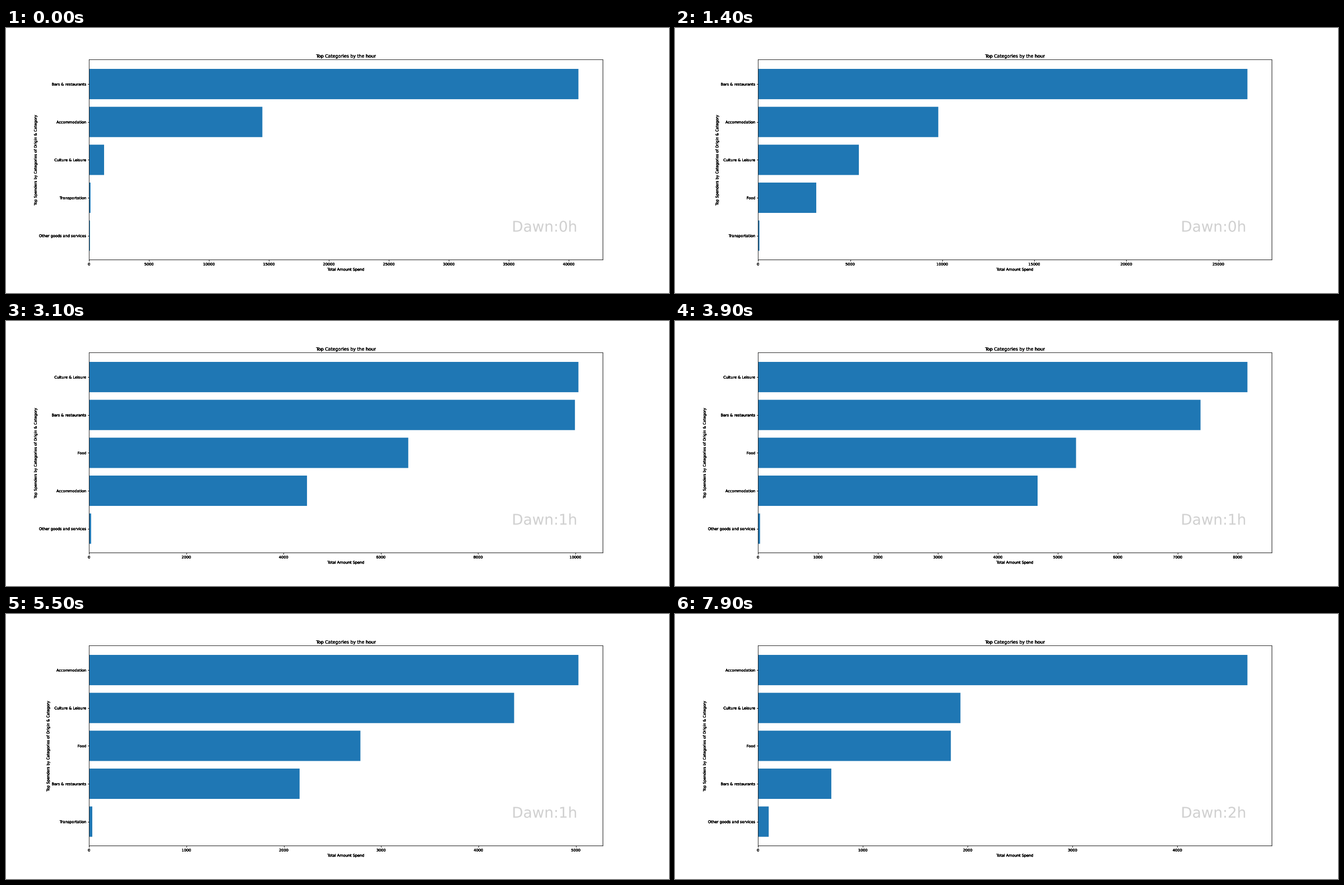
Write a matplotlib script that moves like this. It is 1183 by 473 pixels and loops after 8 s.

```python
import matplotlib.pyplot as plt
import numpy as np
from matplotlib.animation import FuncAnimation
from matplotlib.patheffects import Normal

FRAMES = 80
INTERVAL = 100
STEPS_PER_HOUR = 30
HOURS = np.arange(4)

# Spending at 0h, 1h, 2h and 3h
SPENDING = {
    "Bars & restaurants": (40805, 10316, 532, 795),
    "Accommodation": (14450, 4458, 5141, 4394),
    "Culture & Leisure": (1252, 10299, 3180, 1207),
    "Food": (45, 6720, 2001, 1745),
    "Transportation": (121, 18, 36, 18),
    "Other goods and services": (75, 43, 9, 155),
}

# Text and ticks are painted several times, which darkens their soft edges
plt.rcParams.update({
    "font.family": "DejaVu Sans",
    "font.size": 10,
    "text.hinting": "none",
    "path.effects": [Normal()] * 4,
})

fig, ax = plt.subplots(figsize=(25, 9.9958), dpi=47.32)
fig.subplots_adjust(left=0.1253, right=0.9003, bottom=0.125, top=0.88)


def top_five(hour):
    """Return the five largest categories, smallest first."""
    amounts = {name: np.interp(hour, HOURS, values)
               for name, values in SPENDING.items()}
    return sorted(amounts.items(), key=lambda item: item[1])[-5:]


def draw(frame):
    hour = frame / STEPS_PER_HOUR
    names, amounts = zip(*top_five(hour))
    ax.clear()
    ax.barh(names, amounts, color="#1f77b4", snap=False, path_effects=[])
    for spine in ax.spines.values():
        spine.set(snap=False, path_effects=[Normal()] * 2)
    ax.set_title("Top Categories by the hour")
    ax.set_xlabel("Total Amount Spend")
    ax.set_ylabel("Top Spenders by Categories of Origin & Category")
    ax.text(0.95, 0.141, f"Dawn:{int(hour)}h", transform=ax.transAxes,
            size=40, color="#d0d0d0", ha="right", va="baseline",
            path_effects=[Normal()])
    return []


anim = FuncAnimation(fig, draw, frames=FRAMES, init_func=lambda: draw(0),
                     interval=INTERVAL, repeat=True, repeat_delay=0)
plt.show()
```
